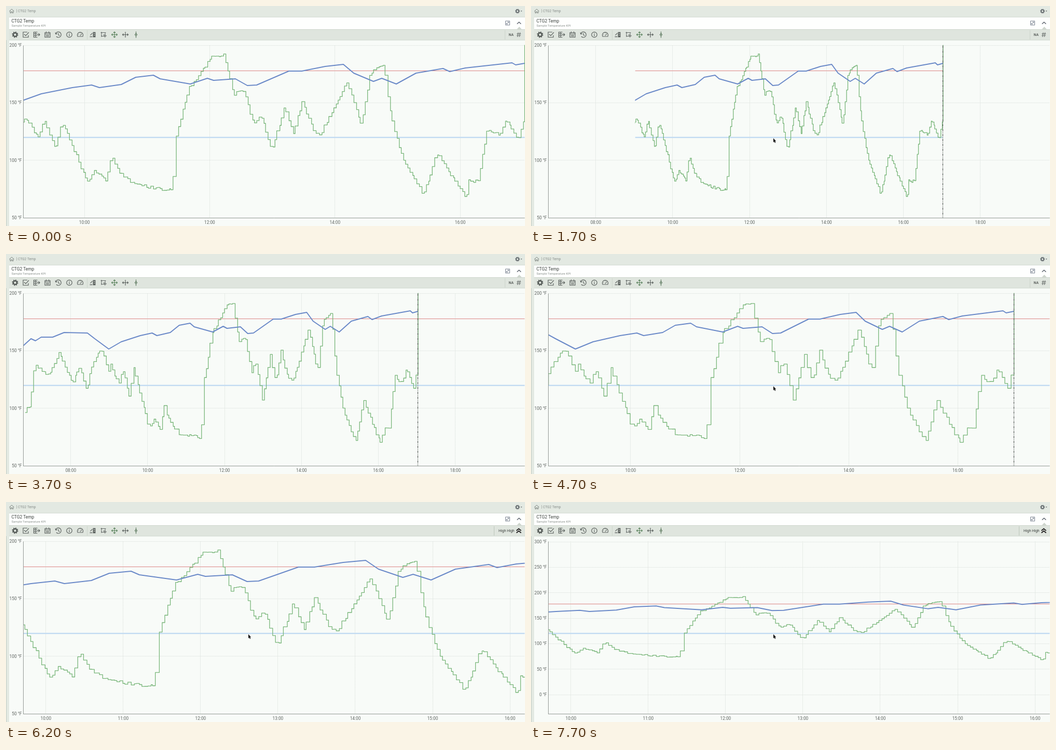
Write an HTML page with a canvas that moves like this. It is 1000 px wide and 426 px high and loops after 8000 ms.

```html
<!DOCTYPE html>
<html lang="en">
<head>
<meta charset="utf-8">
<title>CTG2 Temp</title>
<style>
  html, body { margin: 0; width: 1000px; height: 426px; overflow: hidden; background: #e3e9e2; }
  canvas { display: block; }
</style>
</head>
<body>
<canvas id="view" width="1000" height="426"></canvas>
<script>
const c = document.getElementById('view').getContext('2d');
const LOOP = 8000;
const LEFT = 33.5, RIGHT = 999.5, TOP = 76.5, BOTTOM = 410;
const HOUR = 12.618, HOUR_X = 467;      // fixed point of the time zoom
const TEMP = 119.7, TEMP_Y = 255;       // fixed point of the temperature zoom
const HOUR_SCALE = 120.67, TEMP_SCALE = 2.2233;
const NOW = 17.03;

// Turning points, placed in the unzoomed view, become [hour, temperature].
function curve(...keys) {
  return keys.map(([x, y]) => [
    HOUR + (x - HOUR_X) / HOUR_SCALE,
    TEMP + (TEMP_Y - y) / TEMP_SCALE
  ]);
}

const green = curve(
  [-240, 311], [-215, 296], [-201, 216], [-158, 236], [-122, 190], [-82, 253], [-62, 217],
  [-35, 265], [-26, 224], [9, 181], [30, 228], [38, 216], [63, 253], [76, 221], [97, 279],
  [110, 222], [159, 341], [173, 317], [195, 341], [206, 289], [218, 318], [252, 347],
  [323, 357], [330, 250], [355, 158], [400, 98], [422, 96], [441, 170], [461, 165],
  [480, 231], [493, 208], [514, 281], [539, 195], [556, 248], [572, 185], [594, 241],
  [608, 248], [659, 146], [687, 231], [704, 130], [730, 111], [744, 215], [767, 300],
  [807, 365], [832, 284], [889, 373], [893, 337], [912, 340], [929, 237], [952, 250],
  [965, 223], [990, 259], [999, 222]);
const blue = curve(
  [-240, 178], [-215, 164], [-201, 168], [-183, 161], [-147, 161], [-111, 152], [-38, 153],
  [-15, 164], [29, 184], [68, 170], [128, 158], [165, 153], [180, 158], [222, 152],
  [250, 138], [284, 134], [297, 141], [355, 151], [388, 140], [400, 144], [442, 141],
  [465, 154], [483, 153], [545, 126], [570, 126], [615, 117], [650, 113], [670, 130],
  [708, 146], [724, 140], [752, 151], [790, 130], [842, 121], [855, 127], [885, 120],
  [975, 110], [982, 114], [999, 111]);

function valueAt(list, h) {
  const i = Math.max(1, list.findIndex(p => p[0] >= h));
  const [a, b] = [list[i - 1], list[i]];
  return a[1] + (b[1] - a[1]) * (h - a[0]) / (b[0] - a[0]);
}

const random = k => { const s = Math.sin(k * 12.9898) * 43758.5453; return s - Math.floor(s); };

// Holds each reading until the next one; readings are slightly uneven in time.
function stairs(period) {
  const out = [];
  const start = k => (k + 0.6 * random(k)) * period;
  for (let k = Math.ceil(green[0][0] / period); start(k) < NOW; k++) {
    const a = start(k), b = Math.min(start(k + 1), NOW);
    const v = valueAt(green, (a + b) / 2) + (random(k + 0.5) - 0.5) * 3;
    out.push([a, v], [b, v]);
  }
  out.push([NOW, valueAt(green, NOW)]);
  return out;
}
const fine = stairs(0.036), coarse = stairs(0.054);

// ---- drawing helpers ----
function line(x1, y1, x2, y2, color, width = 1, dash = []) {
  c.strokeStyle = color;
  c.lineWidth = width;
  c.setLineDash(dash);
  c.beginPath();
  c.moveTo(x1, y1);
  c.lineTo(x2, y2);
  c.stroke();
  c.setLineDash([]);
}
function box(x, y, w, h, color) {
  c.fillStyle = color;
  c.fillRect(x, y, w, h);
}
function text(s, x, y, size, color, align = 'left', weight = 400) {
  c.font = `${weight} ${size}px Roboto, sans-serif`;
  c.textAlign = align;
  c.fillStyle = color;
  c.fillText(s, x, y);
}
function icon(x, y, path, color = '#5c625f', width = 1.2, filled = false) {
  c.save();
  c.translate(x, y);
  c.lineWidth = width;
  c.strokeStyle = c.fillStyle = color;
  const p = new Path2D(path);
  if (filled) c.fill(p); else c.stroke(p);
  c.restore();
}
function gear(x, y, r, color) {
  c.strokeStyle = color;
  c.lineWidth = r * 0.42;
  c.beginPath();
  c.arc(x, y, r * 0.58, 0, 7);
  c.stroke();
  c.lineWidth = r * 0.35;
  c.setLineDash([r * 0.325, r * 0.325]);
  c.beginPath();
  c.arc(x, y, r * 0.83, 0, Math.PI * 2);
  c.stroke();
  c.setLineDash([]);
}
function trace(list, x, y, color, width) {
  c.strokeStyle = color;
  c.lineWidth = width;
  c.lineJoin = 'round';
  c.beginPath();
  for (const [h, v] of list) c.lineTo(x(h), y(v));
  c.stroke();
}

const RING = 'M5.2 0A5.2 5.2 0 1 1 -5.2 0A5.2 5.2 0 1 1 5.2 0';
const SIDE_TIPS = 'M-5.5 0H5.5M-3.5 -2L-5.5 0L-3.5 2M3.5 -2L5.5 0L3.5 2';

function drawFrame(alarm) {
  box(0, 0, 1000, 426, '#e3e9e2');
  box(0, 66, 1, 360, '#c3ccc3');
  box(6, 22, 994, 23, '#fefffe');
  line(6, 45.5, 1000, 45.5, '#cdd5cc');
  line(6, 21.5, 1000, 21.5, '#d3dad2');
  box(6, 46, 994, 20, '#dfe5de');
  box(6, 66, 994, 360, '#f8fbf8');
  line(6, 66, 1000, 66, '#cfd7ce');

  icon(11, 10, 'M-4.5 0L0 -4L4.5 0M-3 -1V3.5H-1V1H1V3.5H3V-1', '#757c78', 0.9);
  line(20.5, 6, 20.5, 13, '#b2b8b3');
  text('CTG2 Temp', 23, 12, 6.6, '#858b87');
  gear(985.5, 10, 4.4, '#666d70');
  icon(993, 10, 'M-1.5 -1H1.5L0 1Z', '#666d70', 1, true);

  text('CTG2 Temp', 10.5, 31.5, 8.4, '#3b403d');
  text('Sample Temperature KPI', 10.5, 39.5, 6, '#8d928f');
  icon(966.5, 33, 'M-4 -4H4V4H-4ZM0 -2.2H2.2V0M2 -2L-2 2M-2.2 0V2.2H0', '#6c7686', 0.9);
  icon(988.5, 33, 'M-3.8 1.8L0 -1.8L3.8 1.8', '#555c66', 1.2);
  icon(989, 42, 'M-5 3.5L0 -2L5 3.5Z', '#cfd6ce', 1, true);

  gear(17.5, 55.5, 6, '#565c59');
  icon(38, 55.5, 'M3 -5H-5V5H5V1M-3 -1L0 2L6 -4.5');
  icon(58.5, 55.5, 'M2 -5H-5V5H2M-5 -2H2M-5 1.5H2M-1.5 -5V5M1 0H6M4 -2.5L6.5 0L4 2.5');
  icon(80, 55.5, 'M-5 -4H5V5H-5ZM-5 -1.5H5M-2.5 -6V-3M2.5 -6V-3M-3 1H3M-3 3H3');
  icon(101, 55.5, 'M-5 -2A5.3 5.3 0 1 1 -4 3.5M-6 -4L-5 -1L-2 -2M0 -3V0.5L2.5 2');
  icon(122, 55.5, RING + 'M0 -1V3M0 -3.2V-2');
  icon(143, 55.5, 'M-5 3.5A5.6 5.6 0 1 1 5 3.5ZM0 2L3 -2M-3.5 0H-2.5M0 -3.8V-3');
  line(156.5, 47, 156.5, 65, '#ced6cd');
  icon(167.5, 55.5, 'M0 -5H5V5H0Z', '#5c625f', 1, true);
  icon(167.5, 55.5, 'M-6 4H-1M-5 1L-1 -3M1 -3H4', '#686e6b', 1.3);
  icon(167.5, 55.5, 'M1.5 -2H4M1.5 1H4', '#dfe5de', 0.9);
  icon(188, 55.5, 'M-4 -4H3V3H-4ZM-5.5 -4H-2.5M-4 -5.5V-2.5M1.5 -4H4.5M-4 1.5V4.5M0 0L5.5 2L2.5 5Z', '#656b68', 1);
  icon(209, 55.5, SIDE_TIPS + 'M0 -5.5V5.5M-2 -3.5L0 -5.5L2 -3.5M-2 3.5L0 5.5L2 3.5', '#5b845e', 1.1);
  icon(230, 55.5, SIDE_TIPS + 'M0 -5.5V5.5');
  icon(250.5, 55.5, 'M0 -6V-2.3M0 2.3V6M0 -2.3L2 0L0 2.3L-2 0Z', '#5b785e');

  if (alarm) {
    line(940.5, 47, 940.5, 65, '#bcc6bb');
    text('High High', 949, 58.3, 7, '#3a3f3c');
    icon(988, 55.5, 'M-4.5 0L0 -3.8L4.5 0M-4.5 4.3L0 0.5L4.5 4.3', '#262424', 1.9);
  } else {
    line(961.5, 47, 961.5, 65, '#ccd4cb');
    text('NA', 968.5, 58.3, 6.8, '#4a4f4c', 'left', 500);
    icon(988, 55.5, 'M-1 -4.5L-2.5 4.5M2.5 -4.5L1 4.5M-3.8 -1.6H4.2M-4.2 1.8H3.8', '#6e7471', 1.1);
  }
}

const count = (t, times) => times.filter(x => t >= x).length;
const crisp = p => Math.floor(p) + 0.5;

function draw(t) {
  const loaded = t >= 2800, refined = t >= 6200;
  const out = count(t, [1300, 1500, 1700]);
  const zoomIn = count(t, [4500, 4600, 4700, 4900, 5000, 5100]);
  const sx = HOUR_SCALE * 0.85 ** out * 1.1235 ** zoomIn;
  const sy = TEMP_SCALE * 0.85 ** count(t, [7100, 7200, 7400, 7500, 7700]);
  const x = h => HOUR_X + (h - HOUR) * sx;
  const y = v => TEMP_Y - (v - TEMP) * sy;

  drawFrame(refined);

  // grid and labels
  const step = sx > 125 ? 1 : 2;
  for (let h = 4; h <= 22; h += step) {
    const px = x(h);
    if (px < LEFT || px > RIGHT) continue;
    line(crisp(px), TOP, crisp(px), BOTTOM, '#dfe4e0', 1, [2, 1]);
    text(String(h).padStart(2, '0') + ':00', px, 422.3, 8.3, '#5f6461', 'center');
  }
  for (let v = -50; v <= 300; v += 50) {
    const py = y(v);
    if (py < TOP - 1 || py > BOTTOM + 1) continue;
    if (py < BOTTOM - 1) line(LEFT, crisp(py), RIGHT, crisp(py), '#dfe4e0', 1, [2, 1]);
    text(v + ' °F', 30.5, py + 2.8, 8.4, '#5f6461', 'right');
  }

  // limits and readings, only where data has been loaded
  const from = loaded ? LEFT : x(9.022), to = loaded ? RIGHT : x(NOW);
  c.save();
  c.beginPath();
  c.rect(Math.max(LEFT, from), TOP - 1, RIGHT - from, BOTTOM - TOP + 1);
  c.clip();
  line(from, crisp(y(178)), to, crisp(y(178)), '#dc8585', 1.2);
  line(from, crisp(y(120)), to, crisp(y(120)), '#b9d5f2', 1.8);
  trace(loaded && !refined ? coarse : fine, x, y, '#77b578', 1.3);
  trace(blue, x, y, '#6a89c8', 2);
  c.restore();

  const now = crisp(x(NOW));
  if (now < RIGHT - 2) line(now, TOP, now, BOTTOM, '#4d524f', 1.1, [5, 1.5, 1.5, 1.5]);
  line(LEFT, TOP, LEFT, BOTTOM, '#939995');
  line(LEFT - 0.5, BOTTOM + 0.5, RIGHT, BOTTOM + 0.5, '#939995');

  // pointer
  if (t >= 200 && (t < 3700 || t >= 4500)) {
    const left = 1 - Math.min(1, (Math.floor(t / 100) - 1) / 6);
    icon(467 + 30 * left * left, 256 + 200 * left * left,
      'M0 0V8L1.8 6.4L3 9.2L4.3 8.6L3.1 6H5.2Z', '#111', 1, true);
  }
}

function tick() {
  draw(performance.now() % LOOP);
  requestAnimationFrame(tick);
}
tick();
</script>
</body>
</html>
```
